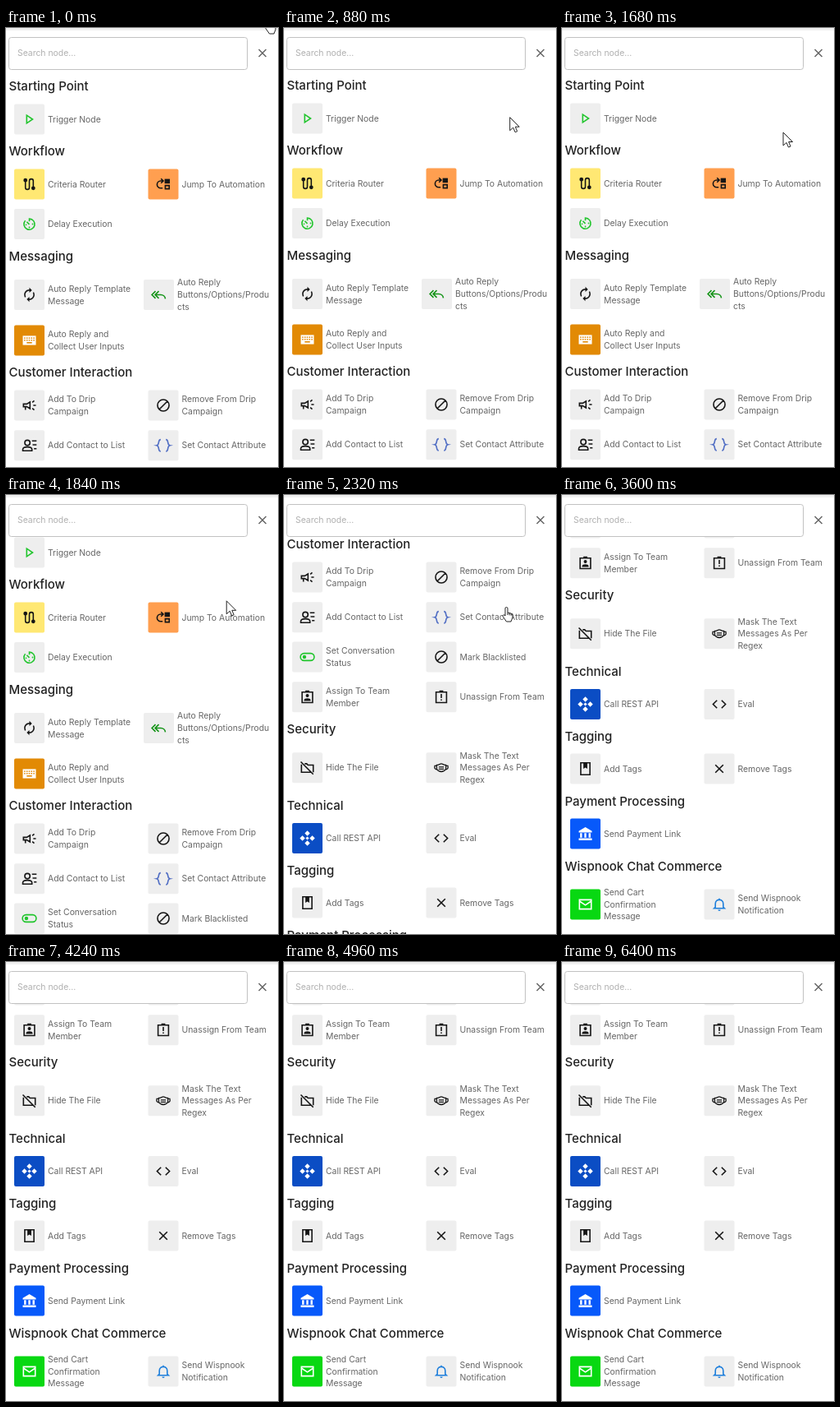
An HTML page with a canvas for the animation above (6.48 s loop, 332 by 534 pixels).

```html
<!DOCTYPE html>
<html lang="en">
<head>
<meta charset="utf-8">
<title>Node picker</title>
<style>
html, body { margin: 0; width: 100%; height: 100%; overflow: hidden; background: #fff; }
canvas { display: block; }
</style>
</head>
<body>
<canvas id="stage" width="332" height="534"></canvas>
<script>
const ctx = document.getElementById('stage').getContext('2d');
const LOOP = 6480, STEP = 80, LIST_TOP = 51;
const FONT = 'Inter, "Open Sans", sans-serif';
const INK = '#161616', GREY = '#eeeeee', GREEN = '#20c52c';

// Icons live on a 24-unit grid: s = stroked path, f = filled path, w = line width.
const dot = (x, y, r) => `M${x - r} ${y}a${r} ${r} 0 1 0 ${2 * r} 0a${r} ${r} 0 1 0 ${-2 * r} 0z`;
const box = (x, y, w, h) => `M${x} ${y}h${w}v${h}h${-w}z`;
const diamond = (x, y, r) => `M${x} ${y - r}l${r} ${r}l${-r} ${r}l${-r} ${-r}z`;
const board = box(4, 4.5, 16, 16);

const icons = {
  play: { s: 'M8 6v12l9-6z', color: GREEN },
  route: { s: 'M6 6V17a3 3 0 0 0 6 0V7a3 3 0 0 1 6 0V18', f: dot(6, 6, 3) + dot(18, 18, 3) },
  jump: { s: 'M11 18H8a5.5 5.5 0 0 1 0-11h3M8.5 3.5l3.5 3.5-3.5 3.5' + box(15, 14, 6, 5),
          f: box(14, 4, 8, 7), bg: '#ff9f50' },
  timer: { s: 'M12 8V4A8.2 8.2 0 1 1 5.8 6.8M8 8.5l4 4', f: dot(12, 17, 1.1) + dot(17, 12, 1.1) + dot(7, 13, 1.1), color: GREEN },
  renew: { f: 'M12 6v3l4-4-4-4v3c-4.4 0-8 3.6-8 8 0 1.6.5 3 1.2 4.3L6.7 14.8c-.4-.8-.7-1.8-.7-2.8 0-3.3 2.7-6 6-6z' +
              'M18.8 7.7L17.3 9.2c.4.8.7 1.8.7 2.8 0 3.3-2.7 6-6 6v-3l-4 4 4 4v-3c4.4 0 8-3.6 8-8 0-1.6-.5-3-1.2-4.3z' },
  replyAll: { s: 'M7 6.5L1.5 12 7 17.5M12 6.5L6.5 12l5.5 5.5M7 12h8a7 7 0 0 1 7 6', color: '#149417' },
  keyboard: { f: box(2, 5, 20, 14), color: '#fff', bg: '#e28a05', keys: true },
  campaign: { s: 'M3 10h5l5-3v10l-5-3H3zM6 14v5M18 12h4M16.5 7.5l3-2.4M16.5 16.5l3 2.4' },
  block: { s: dot(12, 12, 8.8) + 'M6 18L18 6' },
  contact: { s: dot(9, 8, 4) + 'M2 20v-2c0-5 14-5 14 0v2zM16 5h7M17 11h6M19 17h4' },
  braces: { s: 'M8 3C3 3 7 11 2 12C7 13 3 21 8 21M16 3C21 3 17 11 22 12C17 13 21 21 16 21', color: '#526fc4' },
  toggle: { s: 'M7 6.5h10a5.5 5.5 0 0 1 0 11H7a5.5 5.5 0 0 1 0-11z', f: dot(7.5, 12, 2.8), color: GREEN },
  assign: { s: board, f: box(9, 2, 6, 3) + dot(12, 10, 2.5) + 'M7 18v-1.4c0-3.4 10-3.4 10 0V18z' },
  unassign: { s: board, f: box(9, 2, 6, 3) + box(11, 7.5, 2, 6) + box(11, 15.5, 2, 2) },
  folderOff: { s: 'M8 6h3l2 2h8v11M18 19H3V7M2 3l19 19' },
  mask: { s: 'M5 8c3 0 5-2 7-2s4 2 7 2v6c-2 3-5 4-7 4s-5-1-7-4zM5 9H2c-1 4 1 6 4 6M19 9h3c1 4-1 6-4 6M8 11h8M8 14h8', w: 1.6 },
  api: { f: diamond(12, 12, 2.6) + [[12, 4.5], [12, 19.5], [4.5, 12], [19.5, 12]].map(p => diamond(...p, 4)).join(''),
         color: '#fff', bg: '#0b4dc4' },
  code: { s: 'M8.5 6l-6 6 6 6M15.5 6l6 6-6 6' },
  tag: { s: box(5, 3, 14, 18), f: 'M9 3h6v9l-3-2-3 2z' },
  cross: { s: 'M6 6l12 12M18 6L6 18' },
  bank: { f: 'M2 8l10-6 10 6v2H2z' + [4, 10.5, 17].map(x => box(x, 11, 3, 7)).join('') + box(2, 19, 20, 3),
          color: '#fff', bg: '#0759fa' },
  mail: { s: box(3, 5, 18, 14) + 'M3 7l9 6 9-6', color: '#fff', bg: '#08d812' },
  bell: { s: 'M4 18h16l-2-2v-5c0-8-12-8-12 0v5zM12 5V3', f: 'M10 20h4a2 2 0 0 1-4 0z', color: '#1d7edb' }
};
icons.route.bg = '#ffe873';

const headings = [
  ['Starting Point', 71], ['Workflow', 150], ['Messaging', 278], ['Customer Interaction', 419],
  ['Security', 644], ['Technical', 737], ['Tagging', 816], ['Payment Processing', 895],
  ['Wispnook Chat Commerce', 973.5]
];

const LEFT = 10, RIGHT = 173.5;
const nodes = [
  [LEFT, 111, 'play', 'Trigger Node'],
  [LEFT, 190, 'route', 'Criteria Router'],
  [RIGHT, 190, 'jump', 'Jump To Automation'],
  [LEFT, 238.5, 'timer', 'Delay Execution'],
  [LEFT, 324.5, 'renew', 'Auto Reply Template|Message'],
  [168, 324.5, 'replyAll', 'Auto Reply|Buttons/Options/Produ|cts'],
  [LEFT, 380, 'keyboard', 'Auto Reply and|Collect User Inputs'],
  [LEFT, 459, 'campaign', 'Add To Drip|Campaign'],
  [RIGHT, 459, 'block', 'Remove From Drip|Campaign'],
  [LEFT, 507.8, 'contact', 'Add Contact to List'],
  [RIGHT, 507.8, 'braces', 'Set Contact Attribute'],
  [LEFT, 556, 'toggle', 'Set Conversation|Status'],
  [RIGHT, 556, 'block', 'Mark Blacklisted'],
  [LEFT, 604.7, 'assign', 'Assign To Team|Member'],
  [RIGHT, 604.7, 'unassign', 'Unassign From Team'],
  [LEFT, 690.7, 'folderOff', 'Hide The File'],
  [RIGHT, 690.7, 'mask', 'Mask The Text|Messages As Per|Regex'],
  [LEFT, 776.5, 'api', 'Call REST API'],
  [RIGHT, 776.5, 'code', 'Eval'],
  [LEFT, 855, 'tag', 'Add Tags'],
  [RIGHT, 855, 'cross', 'Remove Tags'],
  [LEFT, 934, 'bank', 'Send Payment Link'],
  [LEFT, 1020, 'mail', 'Send Cart|Confirmation|Message'],
  [RIGHT, 1020, 'bell', 'Send Wispnook|Notification']
];

const ARROW = new Path2D('M0 0V16L4 12.4 6.4 18 9 17 6.6 11.5H11.5z');
const HAND = new Path2D('M4 11V2a1.5 1.5 0 0 1 3 0V7l4 1a2.5 2.5 0 0 1 2 2.5V13l-2 5H5.5L1 11.5a1.4 1.4 0 0 1 2-1.5z');

// Each key: [time, value, ...]; straight interpolation between keys.
function track(keys, t, column = 1) {
  const next = keys.findIndex(k => k[0] > t);
  if (next < 0) return keys[keys.length - 1][column];
  if (next === 0) return keys[0][column];
  const a = keys[next - 1], b = keys[next];
  return a[column] + (b[column] - a[column]) * (t - a[0]) / (b[0] - a[0]);
}
const scrollKeys = [[320, 0], [400, 1.3], [1760, 1.3], [1920, 80], [2320, 359], [2560, 480], [2720, 522]];
const cursorKeys = [[0, 316, -11], [80, 316, -11], [640, 280, 95], [1200, 270, 127], [1760, 270, 127],
                    [2160, 266, 136], [2320, 266, 136], [2640, 267.5, 137], [2880, 267.5, 137], [3280, 334, 150]];

function text(str, x, y, size, color, weight = 400) {
  ctx.font = `${weight} ${size}px ${FONT}`;
  ctx.fillStyle = color;
  ctx.fillText(str, x, y + size * 0.35);
}

function roundBox(x, y, w, h, r) {
  ctx.beginPath();
  ctx.roundRect(x, y, w, h, r);
}

function drawIcon(icon, cx, cy) {
  ctx.save();
  ctx.translate(cx, cy);
  ctx.scale(0.8, 0.8);
  ctx.translate(-12, -12);
  ctx.fillStyle = ctx.strokeStyle = icon.color || INK;
  ctx.lineWidth = icon.w || 2;
  if (icon.f) ctx.fill(new Path2D(icon.f));
  if (icon.s) ctx.stroke(new Path2D(icon.s));
  if (icon.keys) {
    ctx.fillStyle = icon.bg;
    for (let i = 0; i < 10; i++) ctx.fillRect(4 + (i % 5) * 3.5, 7.5 + Math.floor(i / 5) * 3.3, 1.9, 1.9);
    ctx.fillRect(8, 14.5, 8, 2);
  }
  ctx.restore();
}

function drawNode([x, y, name, label], hovered) {
  const icon = icons[name], lines = label.split('|');
  if (hovered) {
    ctx.fillStyle = '#f5f5f5';
    ctx.fillRect(173, y - 31, 151, 62);
  }
  ctx.fillStyle = icon.bg || (hovered ? '#ebebeb' : GREY);
  roundBox(x, y - 18.5, 37, 37, 2);
  ctx.fill();
  drawIcon(icon, x + 18.5, y);
  lines.forEach((line, i) => text(line, x + 41, y + (i - (lines.length - 1) / 2) * 14.8, 10.4, '#666'));
}

function drawHeader() {
  ctx.fillStyle = '#fff';
  ctx.fillRect(0, 0, 332, LIST_TOP);
  ctx.fillStyle = '#f0f0f0';
  ctx.fillRect(0, 0, 332, 3);
  ctx.strokeStyle = '#c2c2c2';
  ctx.lineWidth = 1;
  roundBox(3.5, 11.5, 291, 39, 3);
  ctx.stroke();
  text('Search node...', 14, 30.5, 10.4, '#b0b0b0');
  ctx.strokeStyle = '#666';
  ctx.lineWidth = 1.5;
  ctx.stroke(new Path2D('M308.5 26l9 9M317.5 26l-9 9'));
}

function drawCursor(t) {
  if (t >= 3280) return;
  const pointing = t < 160 || t >= 2000;
  ctx.save();
  ctx.translate(track(cursorKeys, t), track(cursorKeys, t, 2));
  ctx.fillStyle = '#fff';
  ctx.strokeStyle = '#222';
  ctx.lineWidth = 1;
  ctx.lineJoin = 'round';
  const shape = pointing ? HAND : ARROW;
  ctx.fill(shape);
  ctx.stroke(shape);
  if (pointing) ctx.stroke(new Path2D('M7 7v3M9.2 7.7v2.6M11.2 8.3v2.4'));
  ctx.restore();
}

function draw(t) {
  const scroll = track(scrollKeys, t);
  ctx.fillStyle = '#fff';
  ctx.fillRect(0, 0, 332, 534);
  ctx.save();
  ctx.translate(0, -Math.round(scroll));
  const hovering = t >= 2720 && t < 3200;
  headings.forEach(([label, y]) => text(label, 3.5, y, 15, '#222', 500));
  nodes.forEach(node => drawNode(node, hovering && node[2] === 'mask'));
  ctx.restore();
  drawHeader();
  drawCursor(t);
}

const start = performance.now();
function frame() {
  const t = (performance.now() - start) % LOOP;
  draw(Math.floor(t / STEP) * STEP);
  requestAnimationFrame(frame);
}
frame();
</script>
</body>
</html>
```
